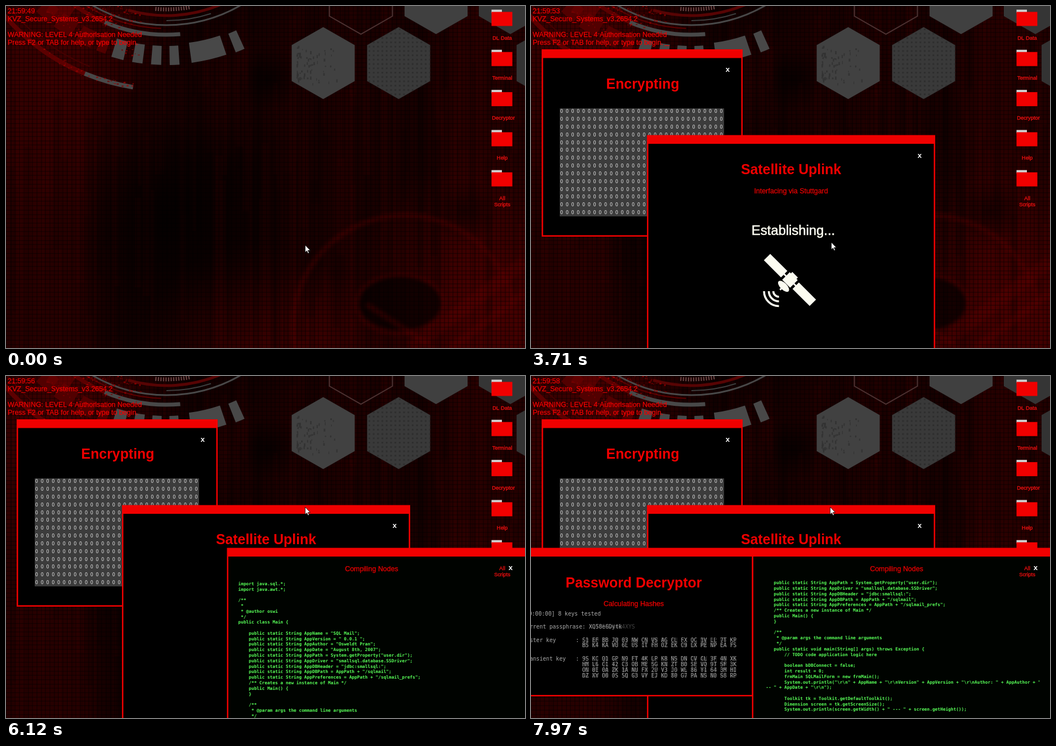
Write an HTML page with a canvas that moves like this. It is 922 by 608 pixels and loops after 8 s.

```html
<!DOCTYPE html>
<html lang="en">
<head>
<meta charset="utf-8">
<title>Secure desktop</title>
<style>
html, body { margin: 0; width: 100%; height: 100%; overflow: hidden; background: #000; }
canvas { display: block; width: 922px; height: 608px; }
</style>
</head>
<body>
<canvas id="stage" width="922" height="608"></canvas>
<script>
const W = 922, H = 608, LOOP = 8000;
const RED = '#f00000';
const SANS = '"Liberation Sans", Arial, sans-serif';
const MONO = '"DejaVu Sans Mono", monospace';
const g = document.getElementById('stage').getContext('2d');

const CODE = String.raw`import java.sql.*;
import java.awt.*;

/**
 *
 * @author oswi
 */
public class Main {

    public static String AppName = "SQL Mail";
    public static String AppVersion = " 0.0.1 ";
    public static String AppAuthor = "Osweldt Pran";
    public static String AppDate = "August 8th, 2007";
    public static String AppPath = System.getProperty("user.dir");
    public static String AppDriver = "smallsql.database.SSDriver";
    public static String AppDBHeader = "jdbc:smallsql:";
    public static String AppDBPath = AppPath + "/sqlmail";
    public static String AppPreferences = AppPath + "/sqlmail_prefs";
    /** Creates a new instance of Main */
    public Main() {
    }

    /**
     * @param args the command line arguments
     */
    public static void main(String[] args) throws Exception {
        // TODO code application logic here

        boolean bDBConnect = false;
        int result = 0;
        frmMain SQLMailForm = new frmMain();
        System.out.println("\r\n" + AppName + "\r\nVersion" + AppVersion + "\r\nAuthor: " + AppAuthor + "
 -- " + AppDate + "\r\n");

        Toolkit tk = Toolkit.getDefaultToolkit();
        Dimension screen = tk.getScreenSize();
        System.out.println(screen.getWidth() + " --- " + screen.getHeight());

        SQLMailForm.setSize(800, 600);
        SQLMailForm.setLocation(
            (int) (screen.getWidth() - 800) / 2,
            (int) (screen.getHeight() - 600) / 2);

        try {
            Class.forName(AppDriver);
            Connection con = DriverManager.getConnection(AppDBHeader + AppDBPath);
            bDBConnect = true;
            con.close();
        } catch (SQLException e) {
            System.out.println(e.getMessage());
        }

        if (bDBConnect) {
            SQLMailForm.setVisible(true);
        } else {
            System.exit(result);
        }
    }`.split('\n');

// Repeatable noise in 0..1
function rnd(a, b = 0, c = 0) {
  let h = Math.imul(a + 11, 374761393) ^ Math.imul(b + 7, 668265263) ^ Math.imul(c + 3, 1274126177);
  h = Math.imul(h ^ (h >>> 15), 2246822519);
  h = Math.imul(h ^ (h >>> 13), 3266489917);
  return ((h ^ (h >>> 16)) >>> 0) / 4294967296;
}

function text(str, x, y, font, color = RED, align = 'left', weight = 0) {
  g.font = font;
  g.fillStyle = g.strokeStyle = color;
  g.textAlign = align;
  g.fillText(str, x, y);
  if (weight) {
    g.lineWidth = weight;
    g.strokeText(str, x, y);
  }
}
const small = (s, x, y, align) => text(s, x, y, `12.43px ${SANS}`, RED, align, .25);
const title = (s, x, y) => text(s, x, y, `bold 24.86px ${SANS}`, RED, 'center');

function poly(c, pts, fill) {
  c.beginPath();
  pts.forEach(([x, y]) => c.lineTo(x, y));
  c.closePath();
  if (fill) { c.fillStyle = fill; c.fill(); }
}

/* ---------- wallpaper ---------- */
function wallpaper() {
  const cv = document.createElement('canvas');
  cv.width = W; cv.height = H;
  const c = cv.getContext('2d');

  const base = c.createLinearGradient(0, 0, W, 0);
  [[0, 40], [.12, 38], [.2, 20], [.32, 13], [.48, 15], [.56, 28], [.7, 26], [.8, 24], [.9, 42], [1, 32]]
    .forEach(([at, v]) => base.addColorStop(at, `rgb(${v},0,0)`));
  c.fillStyle = base;
  c.fillRect(0, 0, W, H);

  const glow = (x, y, r, rgb, alpha) => {
    const gr = c.createRadialGradient(x, y, 0, x, y, r);
    gr.addColorStop(0, `rgba(${rgb},${alpha})`);
    gr.addColorStop(1, `rgba(${rgb},0)`);
    c.fillStyle = gr;
    c.fillRect(0, 0, W, H);
  };
  glow(80, 170, 260, '62,0,0', .6);
  glow(140, 10, 190, '80,0,0', .6);
  glow(390, 130, 160, '50,0,0', .45);
  glow(440, 620, 200, '80,0,0', .6);
  glow(870, 540, 280, '84,0,0', .75);
  glow(560, 590, 130, '70,0,0', .5);
  glow(290, 380, 190, '0,0,0', .65);
  glow(465, 130, 60, '0,0,0', .7);
  glow(815, 365, 60, '0,0,0', .6);

  // soft vertical streaks
  for (let i = 0; i < 150; i++) {
    c.fillStyle = rnd(i, 20) < .5 ? 'rgba(0,0,0,.13)' : 'rgba(85,0,0,.09)';
    c.fillRect(rnd(i, 21) * W, rnd(i, 22) * 500 - 150, 4 + rnd(i, 23) * 14, 150 + rnd(i, 24) * 450);
  }

  // smoky rings at lower right
  c.save();
  c.filter = 'blur(3px)';
  const ring = (x, y, rx, ry, w, alpha) => {
    c.beginPath(); c.ellipse(x, y, rx, ry, 0, 0, 7);
    c.lineWidth = w; c.strokeStyle = `rgba(90,0,0,${alpha})`; c.stroke();
  };
  ring(708, 570, 198, 198, 9, .4);
  c.fillStyle = 'rgba(0,0,0,.6)';
  c.beginPath(); c.ellipse(700, 528, 72, 48, 0, 0, 7); c.fill();
  ring(700, 530, 78, 52, 8, .3);
  [[922, 455, 720, 608, 24], [922, 510, 790, 608, 14], [640, 530, 760, 608, 10]].forEach(([x, y, u, v, w]) => {
    c.beginPath(); c.moveTo(x, y); c.lineTo(u, v);
    c.lineWidth = w; c.strokeStyle = 'rgba(96,0,0,.35)'; c.stroke();
  });
  c.restore();

  // woven grid
  c.fillStyle = 'rgba(0,0,0,.3)';
  for (let x = 0; x < W; x += 7.7) c.fillRect(Math.round(x), 0, 2, H);
  for (let y = 0; y < H; y += 7.7) c.fillRect(0, Math.round(y), W, 2);

  // dial at upper left
  const band = (r, w, from, to, col) => {
    c.beginPath();
    c.arc(285, -230, r, from * Math.PI / 180, to * Math.PI / 180);
    c.lineWidth = w; c.strokeStyle = col; c.stroke();
  };
  const GREY = '#484848', DIM = '#5c0000';
  band(379, 8, 112, 148, DIM);
  band(379, 8, 99, 112.5, GREY);
  band(364, 2, 112, 146, '#450000');
  [[103.2, 107], [97.3, 100.5], [91.6, 94.7], [86, 89]].forEach(([a, b]) => band(318, 34, a, b, GREY));
  band(316, 36, 71.4, 82.3, GREY);
  band(318, 36, 65.6, 68.5, GREY);
  [[109, 112], [114, 119], [121, 127], [129, 134]].forEach(([a, b]) => band(318, 30, a, b, '#520000'));
  band(281, 7, 85, 113, GREY);
  band(281, 7, 113, 140, DIM);
  band(264, 3, 58, 122, GREY);
  band(270, 2, 92, 125, DIM);
  band(247, 5, 66, 106, '#570404');
  band(256, 2, 72, 90, '#3d3d3d');
  for (let i = 0; i < 14; i++) band(236, 7, 80 + i * 1.1, 80.5 + i * 1.1, '#6b4444');
  c.save();
  c.translate(98, 12); c.rotate(.6);
  c.fillStyle = 'rgba(110,0,0,.55)';
  c.fillRect(-24, -20, 40, 32);
  c.restore();
  for (let i = 0; i < 260; i++) {
    const a = (80 + rnd(i, 1) * 54) * Math.PI / 180;
    const r = [379, 318, 281, 264, 247][i % 5] + (rnd(i, 2) - .5) * 14;
    const x = 285 + r * Math.cos(a), y = -230 + r * Math.sin(a);
    if (x > 240) continue;
    c.fillStyle = `rgba(${110 + rnd(i, 3) * 70 | 0},0,0,.7)`;
    c.fillRect(x, y, 1 + rnd(i, 5) * 3, 1 + rnd(i, 6) * 2);
  }

  // hexagons
  const hex = (x, y, fill) => {
    poly(c, [[x, y - 64], [x + 56, y - 32], [x + 56, y + 32], [x, y + 64], [x - 56, y + 32], [x - 56, y - 32]], fill);
  };
  hex(563.5, 101.5, '#414141');
  hex(764, -14, '#404040');
  hex(896, -14, '#353535');
  hex(963, 101.5, '#333');
  hex(697.5, 101.5, '#393939');
  c.save(); c.clip();
  c.fillStyle = '#2e2e2e';
  for (let x = 644; x < 754; x += 7.7)
    for (let y = 40; y < 166; y += 7.7) c.fillRect(x, y, 3, 3);
  c.restore();
  hex(630.5, -14);
  c.lineWidth = 2; c.strokeStyle = '#4d3232'; c.stroke();
  c.fillStyle = '#333';
  for (let i = 0; i < 70; i++) c.fillRect(516 + rnd(i, 8) ** 2 * 80, 70 + rnd(i, 9) * 70, 1 + rnd(i, 10) * 2, 2 + rnd(i, 12) * 4);
  return cv;
}

/* ---------- windows ---------- */
function frame(x, y, w, h, fill = '#000') {
  g.fillStyle = RED;
  g.fillRect(x, y, w, h);
  g.fillStyle = fill;
  g.fillRect(x + 2.5, y + 15.5, w - 5, h - 18);
}
const closeMark = (x, y) => text('x', x, y + 3.5, 'bold 13px "Liberation Mono", monospace', '#fff', 'center');

const BAR_TIMES = [[890, 1], [1090, 2], [1270, 3], [1450, 5], [1670, 8], [1850, 9], [2050, 10],
  [2240, 11], [2440, 12], [2590, 13], [2820, 15], [3010, 17]];

function download(t) {
  frame(206, 229.5, 512, 215);
  closeMark(690.5, 266);
  title('Downloading...', 462, 299);
  small('Critical Data', 462, 333, 'center');
  const n = BAR_TIMES.reduce((k, [at, v]) => t >= at ? v : k, 0);
  g.fillStyle = '#737779';
  for (let i = 0; i < n; i++) g.fillRect(295 + i * 13.9, 366, 12, 28);
}

// Each pass: begins as zeros, scrambles from `base` with `step`
const PASSES = [[1830, 1830, 102], [3710, 4320, 110], [6120, 6120, 125], [7960, 7960, 110]];
const SHADES = ['#000', '#000', '#0c0c0c', '#1c1c1c', '#2c2c2c', '#383838', '#444', '#555', '#888', '#bbb'];

function encrypt(t) {
  frame(19, 77, 357, 333);
  closeMark(349.5, 113);
  title('Encrypting', 198.5, 147);
  const [, base, step] = PASSES.filter(p => t >= p[0]).pop();
  const k = Math.max(0, Math.min(8, Math.floor((t - base) / step)));
  const mix = Math.min(1, k / 4);
  g.save();
  g.beginPath(); g.rect(51, 182, 292, 192); g.clip();
  g.fillStyle = k ? '#000' : '#3c3c3c';
  g.fillRect(51, 182, 292, 192);
  for (let r = 0; r < 14; r++) for (let c = 0; c < 30; c++) {
    const x = 49.5 + c * 9.78, y = 181.5 + r * 13.83, id = r * 30 + c;
    let d = 0;
    if (k) {
      const white = rnd(id, k, 1) < .11 * mix;
      g.fillStyle = white ? '#fff' : SHADES[Math.floor(rnd(id, k, 2) ** 1.5 * 10)];
      g.fillRect(x, y, 9.9, 13.9);
      if (white || rnd(id, k, 5) < .06) continue;
      if (rnd(id, k, 3) < .15 + .6 * mix) d = Math.floor(rnd(id, k, 4) * 10);
    }
    text(d, x + 4.9, y + 8.8, '8px "DejaVu Sans", sans-serif', k ? '#c8c8c8' : '#e4e4e4', 'center');
  }
  g.restore();
}

function satellite(t) {
  frame(206, 229.5, 512, 420);
  closeMark(690.5, 266);
  title('Satellite Uplink', 462, 299);
  small('Interfacing via Stuttgard', 462, 333, 'center');
  if (t < 3710) return;
  const ink = '#fbfbf0';
  text('Establishing...', 466, 407, `23.85px ${SANS}`, ink, 'center', .6);
  g.save();
  g.translate(460, 487);
  g.rotate(Math.PI / 4);
  g.fillStyle = ink;
  g.fillRect(-57.5, -8, 43, 16);
  g.fillRect(14.5, -8, 43, 16);
  g.fillRect(-10, -9.5, 20, 19);
  g.fillRect(-7, -13, 14, 4);
  g.fillRect(-16, -1.5, 32, 3);
  g.beginPath(); g.ellipse(0, 16, 12.5, 6, 0, 0, 7); g.fill();
  g.fillRect(-1.5, 20, 3, 5);
  g.restore();
  g.lineWidth = 3.6;
  [10, 18, 26.5].forEach(r => {
    g.beginPath(); g.arc(440.5, 507, r, Math.PI / 2, Math.PI); g.stroke();
  });
}

const SCROLL = [0, 6, 13, 20, 26, 33];

function compiler(t) {
  frame(392.5, 305.5, 560, 330, '#000300');
  closeMark(896.5, 341.5);
  small('Compiling Nodes', 649.5, 346.7, 'center');
  const s = Math.max(0, Math.floor((t - 4780) / 220)) % 6;
  const rows = s ? 24 : 25, top = s ? 370.3 : 371.8;
  g.save();
  g.beginPath(); g.rect(396, 322, 508, 286); g.clip();
  for (let i = 0; i < rows; i++)
    text(CODE[SCROLL[s] + i] || '', 412.5, top + i * 9.79, `bold 7.8px ${MONO}`, '#58ff58');
  g.restore();
}

const CHARS = 'ABCDEFGHIJKLMNOPQRSTUVWXYZ0123456789';
const pick = (a, b, c) => CHARS[Math.floor(rnd(a, b, c) * 36)];
const pairs = (n, row) => Array.from({ length: 16 }, (_, i) => pick(n, row, i * 2) + pick(n, row, i * 2 + 1)).join(' ');
function phrase(n, len) {
  let s = '';
  for (let i = 0; i < len; i++) {
    const ch = pick(n, 50, i);
    s += rnd(n, 51, i) < .5 ? ch.toLowerCase() : ch;
  }
  return s;
}

function decryptor(t) {
  frame(-30, 305.5, 425, 264);
  title('Password Decryptor', 182.5, 375.5);
  small('Calculating Hashes', 182.5, 409, 'center');
  const n = Math.floor((t - 6450) / 50), keys = 8 + 2 * (n % 30);
  const line = (s, x, y, col = '#aaa') => text(s, x, y, `9.7px ${MONO}`, col);
  line(`[00:00:0${Math.floor(keys / 16)}] ${keys} keys tested`, -16, 425.5);
  line('Current passphrase:', -14, 448.5);
  line('Master key', -14, 472.5); line(':', 79.5, 472.5);
  line('Transient key', -14, 505.5); line(':', 79.5, 505.5);
  // the previous keys linger faintly
  [[n + 99, '#444', 14], [n + 100, '#a0a0a0', 10]].forEach(([k, col, len]) => {
    line(phrase(k, len), 103, 448.5, col);
    [472.5, 482, 505.5, 515.5, 525.5, 535.5].forEach((y, row) => line(pairs(k, row), 91, y, col));
  });
}

/* ---------- desktop ---------- */
function icons() {
  ['DL Data', 'Terminal', 'Decryptor', 'Help', 'All Scripts'].forEach((name, i) => {
    const y = i * 71.3;
    g.fillStyle = '#d0d0d0';
    g.fillRect(862.5, 6.5 + y, 18.5, 6);
    g.fillStyle = RED;
    g.fillRect(862.5, 10.5 + y, 37, 25);
    const x = name === 'Decryptor' ? 883.5 : 881.5;
    (i === 4 ? name.split(' ') : [name]).forEach((s, j) =>
      text(s, x, 59.5 + y + j * 11, `9.4px ${SANS}`, '#f41010', 'center', .3));
  });
}

function status(t) {
  small('21:59:' + (49 + Math.floor((t + 800) / 960)), 3, 13);
  small('KVZ_Secure_Systems_v3.2654.2', 3, 27);
  small('WARNING: LEVEL 4 Authorisation Needed', 3, 55);
  small('Press F2 or TAB for help, or type to begin.', 3, 69);
  if (t >= 400 && Math.floor((t - 400) / 488) % 2 === 0) {
    g.fillStyle = RED;
    g.fillRect(237, 70, 9, 1);
  }
}

const ease = (t, a, b) => {
  const p = Math.max(0, Math.min(1, (t - a) / (b - a)));
  return p * p * (3 - 2 * p);
};

function pointer(t) {
  const a = ease(t, 1270, 1450), b = ease(t, 3710, 4320);
  const x = 531.5 + 2 * a - 2 * b, y = 425 - 5 * a - 187 * b;
  const p = [[0, 0], [0, 13], [3, 10.3], [5, 15], [7, 14], [5, 9.6], [9, 9.4]];
  poly(g, p.map(([u, v]) => [x + u, y + v]), '#fff');
  g.lineWidth = .8;
  g.strokeStyle = '#000';
  g.stroke();
}

const wall = wallpaper();

function draw(t) {
  g.drawImage(wall, 0, 0);
  status(t);
  if (t >= 690 && t < 3220) download(t);
  if (t >= 1850) encrypt(t);
  if (t >= 3220) satellite(t);
  if (t >= 6450) decryptor(t);
  if (t >= 4750) compiler(t);
  icons();
  pointer(t);
}

const start = performance.now();
function tick() {
  draw((performance.now() - start) % LOOP);
  requestAnimationFrame(tick);
}
tick();
</script>
</body>
</html>
```
